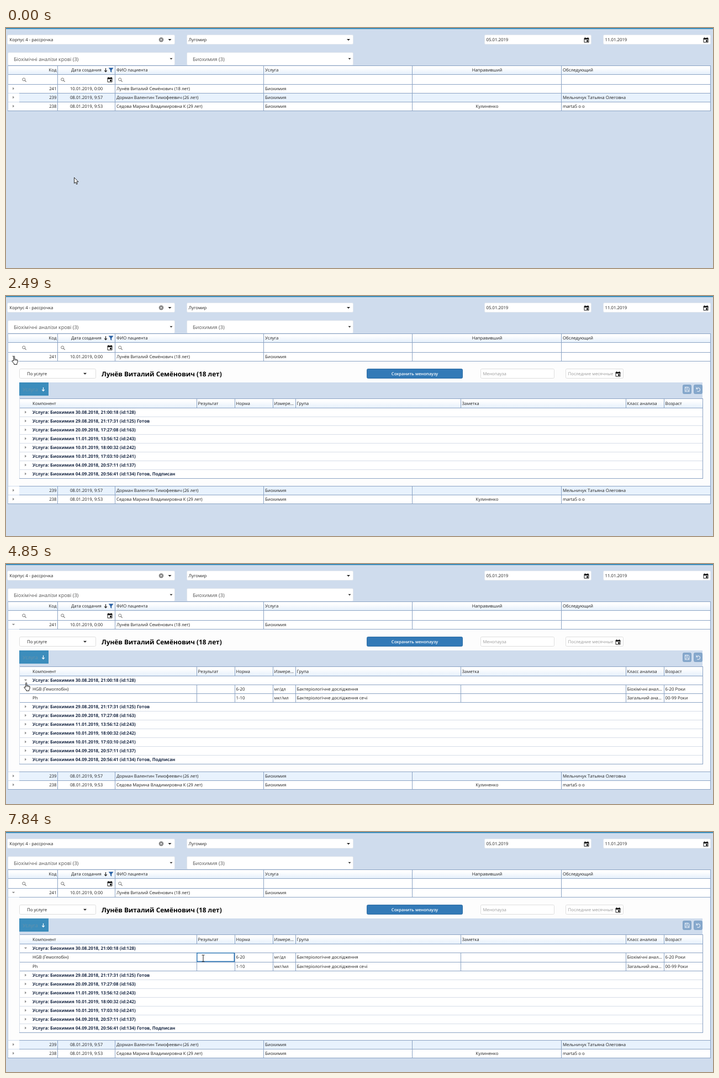
Animation of 1280 by 436 pixels, one loop 7990 ms. Source, as an HTML page:

```html
<!DOCTYPE html>
<html lang="ru">
<head>
<meta charset="utf-8">
<title>Журнал анализов</title>
<style>
  html, body { margin: 0; width: 100%; height: 100%; overflow: hidden; background: #cfdced; }
  svg { display: block; width: 100%; height: 100%; }
  text {
    font-family: "Open Sans", "Noto Sans", sans-serif;
    text-rendering: geometricPrecision;
    white-space: pre;
  }
  .crisp { shape-rendering: crispEdges; }
</style>
</head>
<body>
<svg viewBox="0 0 1280 436" xmlns="http://www.w3.org/2000/svg">
  <defs>
    <linearGradient id="head" x1="0" y1="0" x2="0" y2="1">
      <stop offset="0.2" stop-color="#fff"/>
      <stop offset="1" stop-color="#e6f0fb"/>
    </linearGradient>
  </defs>
  <g id="page"></g>
  <g id="pointer" stroke-linejoin="round"></g>
</svg>
<script>
const LOOP = 7990;
const LINE = '#8ba3c4', PALE = '#d6dde8', BLUE = '#337ab7', TEAL = '#3c8dbc';
const page = document.getElementById('page');
const pointer = document.getElementById('pointer');

// Drawing helpers
const box = (x, y, w, h, fill) =>
  `<rect class="crisp" x="${x}" y="${y}" width="${w}" height="${h}" fill="${fill}"/>`;
const hline = (x1, x2, y, color = LINE) => box(x1, y, x2 - x1, 1, color);
const vline = (x, y1, y2, color = LINE) => box(x, y1, 1, y2 - y1, color);
const round = (x, y, w, h, fill, stroke, r = 2) =>
  `<rect x="${x + .5}" y="${y + .5}" width="${w - 1}" height="${h - 1}" rx="${r}" fill="${fill}" stroke="${stroke}"/>`;
const frame = (x, y, w, h) =>
  `<rect x="${x + .75}" y="${y + .75}" width="${w - 1.5}" height="${h - 1.5}" fill="none" stroke="${BLUE}" stroke-width="1.5"/>`;
const path = (d, fill, stroke = 'none', width = 1) =>
  `<path d="${d}" fill="${fill}" stroke="${stroke}" stroke-width="${width}"/>`;

// Text is placed by the middle of its capitals
function text(x, mid, str, { size = 7.8, fill = '#1c1c1c', weight = 400, anchor = 'start' } = {}) {
  return `<text x="${x}" y="${mid + size * .357}" font-size="${size}" font-weight="${weight}" fill="${fill}" text-anchor="${anchor}">${str}</text>`;
}

// Icons
const caret = (x, y, w = 6, fill = '#222') =>
  path(`M${x - w / 2} ${y - w / 4}h${w}l${-w / 2} ${w / 2}z`, fill);
const expander = (x, y, open) => open
  ? caret(x, y, 5.4, '#858585')
  : path(`M${x - 1.3} ${y - 2.6}l2.7 2.6l-2.7 2.6z`, '#858585');
const lens = (x, y) =>
  `<circle cx="${x - .8}" cy="${y - .6}" r="2.5" fill="none" stroke="#777"/>` +
  path(`M${x + 1} ${y + 1.2}l2.6 2.6`, 'none', '#777', 1.2);
const calendar = (x, y) =>
  path(`M${x - 4} ${y - 3.6}h8v7.7h-8z`, 'none', '#222', 1) +
  box(x - 4, y - 4, 8, 3, '#222') + box(x - 3, y - 5, 1, 1, '#222') + box(x + 2, y - 5, 1, 1, '#222') +
  box(x, y, 3, 3, '#222');
const downArrow = (x, y, color) =>
  path(`M${x} ${y - 3.4}v6.4M${x - 2.3} ${y + .9}l2.3 2.4l2.3 -2.4`, 'none', color, 1.2);

function filters() {
  const field = (x, w) => round(x, 12, w, 18, '#fff', '#e3e8ef');
  const select = (x, w, str) => round(x, 44, w, 24, '#fff', '#e0e5ec') +
    text(x + 11, 57, str, { size: 9.1, fill: '#555' }) + caret(x + w - 7, 56, 5);
  return box(0, 0, 1280, 2, TEAL) +
    field(2, 304) + text(6.5, 21.6, 'Корпус 4 - рассрочка') +
    '<circle cx="281" cy="21.3" r="4.2" fill="#858585"/>' +
    path('M279.4 19.7l3.2 3.2m0 -3.2l-3.2 3.2', 'none', '#fff') + caret(296.5, 21.5) +
    field(327, 302) + text(330.5, 21.6, 'Лугомир') + caret(620, 21.5) +
    field(866, 194) + text(869.5, 21.6, '05.01.2019') + calendar(1051, 22) +
    field(1081, 195) + text(1084.5, 21.6, '11.01.2019') + calendar(1267, 22) +
    select(3, 303, 'Біохімічні аналізи крові (3)') +
    select(327, 302, 'Биохимия (3)');
}

const COLS = [93, 197, 466, 735, 1005];
const PATIENT = 'Лунёв Виталий Семёнович (18 лет)';

function gridRow(y, [code, date, name, sender = '', examiner = ''], { alt, open } = {}) {
  const mid = y + 8.3;
  return box(3, y + 1, 1273, 15, '#fff') + (alt ? box(24, y + 1, 1252, 15, '#e8f2fd') : '') +
    expander(13.5, y + 8, open) +
    text(91.5, mid, code, { anchor: 'end' }) +
    text(145.5, mid, date, { anchor: 'middle' }) +
    text(200, mid, name) + text(469, mid, 'Биохимия') +
    text(871, mid, sender, { anchor: 'middle' }) + text(1008, mid, examiner) +
    COLS.map(x => vline(x, y, y + 16)).join('') + hline(24, 1276, y + 16);
}

function gridHead() {
  return box(3, 68, 1273, 35, '#fff') + box(3, 69, 1273, 15, 'url(#head)') +
    text(91.5, 76.6, 'Код', { anchor: 'end' }) + text(118, 76.6, 'Дата создания') +
    downArrow(180.5, 76.3, '#222') +
    path('M185.6 72.2h9l-3.4 4.2v4.4l-2.2 -1.6v-2.8z', '#2b62a5') +
    text(200, 76.6, 'ФИО пациента') + text(469, 76.6, 'Услуга') +
    text(871, 76.6, 'Направивший', { anchor: 'middle' }) + text(1008, 76.6, 'Обследующий') +
    [33, 103, 207].map(x => lens(x, 94)).join('') + calendar(188, 94) +
    COLS.map(x => vline(x, 68, 103)).join('') +
    hline(3, 1276, 68) + hline(3, 1276, 84) + hline(3, 1276, 102);
}

const SUB_COLS = [345, 414, 483, 524, 823, 1122, 1191];
const SUB_HEAD = ['Компонент', 'Результат', 'Норма', 'Измере...', 'Група', 'Заметка', 'Класс анализа', 'Возраст'];
const GROUPS = [
  '30.08.2018, 21:00:18 (id:128)',
  '29.08.2018, 21:17:31 (id:125) Готов',
  '20.09.2018, 17:27:08 (id:163)',
  '11.01.2019, 13:56:12 (id:243)',
  '10.01.2019, 18:00:32 (id:242)',
  '10.01.2019, 17:03:10 (id:241)',
  '04.09.2018, 20:57:11 (id:137)',
  '04.09.2018, 20:56:41 (id:134) Готов, Подписан'
];
const TESTS = [
  ['HGB (Гемоглобін)', '', '6-20', 'мг/дл', 'Бактеріологічне дослідження', '', 'Біохімічні анал...', '6-20 Роки'],
  ['Ph', '', '1-10', 'мкг/мл', 'Бактеріологічне дослідження сечі', '', 'Загальний ана...', '00-99 Роки']
];
const subX = i => i ? SUB_COLS[i - 1] + 2.6 : 48;
const subTexts = (items, mid) => items.map((s, i) => text(subX(i), mid, s)).join('');
const subLines = (y1, y2) => SUB_COLS.map(x => vline(x, y1, y2)).join('');

function detailTools(hover) {
  const hint = { fill: '#999' };
  return round(24, 132, 139, 18, '#fff', hover ? '#b5bcc6' : '#dedede') +
    text(38, 141.6, 'По услуге') + caret(143, 141.3) +
    text(173, 141.5, PATIENT, { size: 11.8, weight: 700, fill: '#000' }) +
    round(653, 132, 174, 18, BLUE, '#2e6da4') +
    text(740, 141.6, 'Сохранить менопаузу', { size: 7.6, weight: 600, fill: '#fff', anchor: 'middle' }) +
    round(859, 132, 134, 18, '#fff', '#dedede') + text(863.5, 141.6, 'Менопауза', hint) +
    round(1013, 132, 105, 18, '#fff', '#dedede') + text(1017.5, 141.6, 'Последние месячные', hint) +
    calendar(1108, 142) +
    box(24, 157, 1237, 29, '#cfdced') + box(24, 157, 53, 24, TEAL) +
    text(30, 169.6, 'Услуга', { size: 8.9, fill: '#6793ab' }) + downArrow(67.5, 169.3, '#fff') +
    round(1225, 161, 16, 17, '#86a8cc', '#7fa2c7') + round(1245, 161, 16, 17, '#86a8cc', '#7fa2c7') +
    path('M1229.3 165.5h6l1.7 1.7v6.5h-7.7zM1231 165.5v2.6h3.4v-2.6M1231 173.7v-3h4.4v3', 'none', '#e3ebf5') +
    path('M1250 166v3h3M1250.2 168.8a3.3 3.3 0 1 1 1 4', 'none', '#e3ebf5', 1.2);
}

function detail({ stage, hover, rowFocus, inputCaret }, bottom) {
  const expanded = stage > 1, grow = stage > 2 ? 1 : 0;
  let out = box(3, 119, 1273, bottom - 105, '#fdfdfd') + detailTools(hover) +
    box(24, 186, 1238, bottom - 186, '#fff') + box(24, 187, 1238, 16, 'url(#head)') +
    subTexts(SUB_HEAD, 195.3) + subLines(186, 203);
  GROUPS.forEach((g, i) => {
    const y = 203 + 16 * i + (expanded && i ? 32 + grow : 0);
    out += expander(35.5, y + 8, expanded && !i) +
      text(48, y + 8.5, 'Услуга: Биохимия ' + g, { size: 8.05, weight: 700, fill: '#1d2c48' }) +
      hline(24, 1262, y + 16, PALE);
  });
  if (expanded) {
    const split = 235 + grow;
    out += subTexts(TESTS[0], 227.5) + subTexts(TESTS[1], split + 8.5) +
      subLines(219, split + 16) +
      hline(24, 1262, 219) + hline(24, 1262, split) + hline(24, 1262, split + 16);
  }
  out += hline(24, 1262, 186) + hline(24, 1262, 203) + hline(24, 1262, bottom) +
    vline(24, 186, bottom, PALE) + vline(1261, 186, bottom);
  if (rowFocus) out += frame(25, 203, 1236, 16);
  if (grow) out += frame(345, 219, 69, 17);
  if (inputCaret) out += vline(348, 222, 233, '#000');
  return out;
}

function drawPage(s) {
  const bottom = [0, 331, 363, 364][s.stage];
  const next = s.stage ? bottom + 14 : 118;
  return filters() + gridHead() +
    gridRow(102, ['241', '10.01.2019, 0:00', PATIENT], { open: s.stage > 0 }) +
    (s.stage ? detail(s, bottom) + hline(24, 1276, next) : '') +
    gridRow(next, ['239', '08.01.2019, 9:57', 'Дорман Валентин Тимофеевич (26 лет)', '', 'Мельничук Татьяна Олеговна'], { alt: true }) +
    gridRow(next + 16, ['238', '08.01.2019, 9:53', 'Седова Марина Владимировна К (29 лет)', 'Кулиненко', 'marta5 o o']) +
    hline(3, 1276, next + 32) + vline(3, 68, next + 32, '#b9c8dc') + vline(1275, 68, next + 32) +
    (s.cellFocus ? frame(3, 102, 22, 16) : '');
}

// Pointer shapes and its hops: time, left, top, shape
const SHAPES = {
  arrow: path('M.5 .6V11.2L2.9 9L4.6 12.9L6.3 12.2L4.7 8.4H8Z', '#fff', '#111', .9),
  hand: path('M3.6 9V1.6a1 1 0 0 1 2 0V6q1 -.9 1.9 .1v.3q1.1 -.6 1.9 .3v.3q1.3 -.4 1.7 .8v3.4l-1.3 2.4v1.8H4.7V14L1 9.8q-.4 -1.6 1.1 -1.4z', '#fff', '#111', .95) +
    path('M5.6 6v2.4M7.5 6.3v2.2M9.4 6.8v1.9', 'none', '#111', .7),
  beam: path('M.6 .5h1.6l.8 .7l.8 -.7h1.6M3 1.2v10.6M.6 12.5h1.6l.8 -.7l.8 .7h1.6', 'none', '#111', .95)
};
const HOPS = [
  [0, 123, 271, 'arrow'], [120, 114, 268, 'arrow'], [240, 98, 261, 'arrow'], [390, 78, 242, 'arrow'],
  [540, 61, 215, 'arrow'], [660, 46, 189, 'arrow'], [810, 36, 174, 'arrow'], [940, 30, 166, 'arrow'],
  [1090, 22, 148, 'arrow'], [1220, 15, 131, 'hand'], [1360, 12, 120, 'hand'], [1510, 11, 113, 'hand'],
  [1630, 10, 109, 'hand'], [3050, 11, 112, 'hand'], [3200, 19, 127, 'arrow'], [3330, 28, 143, 'arrow'],
  [3480, 31, 162, 'arrow'], [3600, 32, 183, 'arrow'], [3750, 30, 201, 'hand'], [3900, 31, 209, 'hand'],
  [4030, 32, 215, 'hand'], [5310, 36, 215, 'hand'], [5430, 55, 222, 'hand'], [5560, 86, 233, 'hand'],
  [5680, 119, 243, 'hand'], [5830, 182, 252, 'hand'], [5960, 241, 255, 'hand'], [6110, 275, 252, 'hand'],
  [6230, 297, 248, 'hand'], [6380, 323, 241, 'hand'], [6530, 338, 236, 'hand'], [6650, 347, 232, 'hand'],
  [6770, 352, 229, 'hand'], [6920, 353, 227, 'hand'], [7050, 351, 224, 'hand'], [7170, 349, 222, 'hand'],
  [7310, 354, 223, 'beam']
];

let shownPage = '', shownShape = '';

function render(t) {
  const during = (from, to) => t >= from && t < to;
  const state = {
    stage: [2490, 4850, 7310].filter(start => t >= start).length,
    cellFocus: during(2220, 2490),
    hover: during(3330, 3480),
    rowFocus: during(4580, 4850),
    inputCaret: during(7310, 7840)
  };
  const key = JSON.stringify(state);
  if (key !== shownPage) {
    page.innerHTML = drawPage(state);
    shownPage = key;
  }
  const [, x, y, shape] = HOPS.filter(hop => t >= hop[0]).pop();
  if (shape !== shownShape) {
    pointer.innerHTML = SHAPES[shape];
    shownShape = shape;
  }
  pointer.setAttribute('transform', `translate(${x} ${y})`);
}

const start = performance.now();
function tick() {
  render((performance.now() - start) % LOOP);
  requestAnimationFrame(tick);
}
tick();
</script>
</body>
</html>
```
